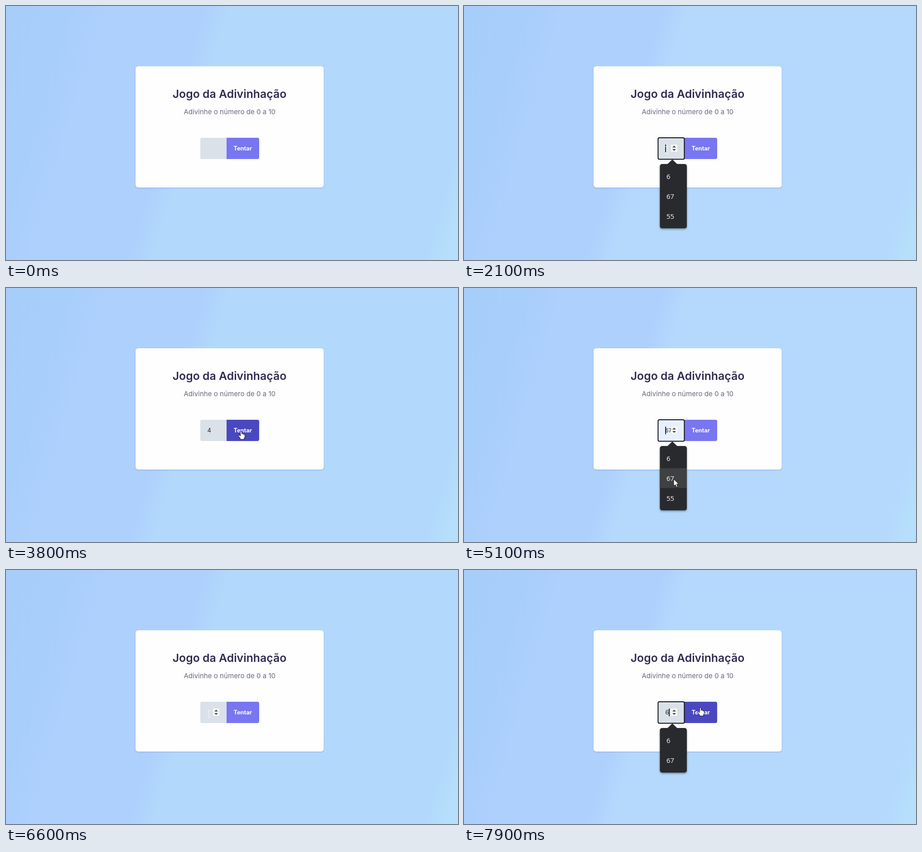
Write an HTML page that moves like this. It is 998 by 561 pixels and loops after 8000 ms.

```html
<!DOCTYPE html>
<html lang="pt">
<head>
<meta charset="utf-8">
<title>Jogo da Adivinhação</title>
<style>
  html, body { margin: 0; width: 100%; height: 100%; overflow: hidden; }
  body {
    --wide: #b2d9fb;
    background: linear-gradient(107deg,
      #a7cefb 0, #a8cefc 125px, #aed0fd 225px, #aed0fd 422px,
      var(--wide) 476px, var(--wide) 1050px, #b5dffa 1090px);
  }
  body.open { --wide: #b5d9fd; }
  svg { display: block; }
  text { font-family: Inter, "Open Sans", sans-serif; }
  .mid { text-anchor: middle; }
  .card { filter: drop-shadow(0 1.5px 1.5px rgba(60, 100, 170, .35)); }
  .menu { filter: drop-shadow(0 2px 2px rgba(0, 0, 0, .4)); }
  .menu text { font: 15px "Open Sans", "Noto Sans", sans-serif; fill: #fff; }
  #value { font-size: 13px; fill: #222; }
  #value.preview { font: 12.5px "Liberation Sans", Arial, sans-serif; }
</style>
</head>
<body>
<svg width="998" height="561" viewBox="0 0 998 561">
  <rect class="card" x="286" y="133" width="415.5" height="268" rx="6" fill="#fefefe"/>
  <text class="mid" x="493.5" y="202.5" font-size="24.8" font-weight="600" fill="#2e2b52">Jogo da Adivinhação</text>
  <text class="mid" x="493.8" y="239" font-size="15.1" fill="#6a677c">Adivinhe o número de 0 a 10</text>

  <path id="button" d="M487 291h68a4 4 0 0 1 4 4v39a4 4 0 0 1-4 4h-68z"/>
  <text class="mid" x="522.7" y="319" font-size="12.8" font-weight="700" fill="#fff">Tentar</text>

  <path id="field" d="M487 291h-54a4 4 0 0 0-4 4v39a4 4 0 0 0 4 4h54z"/>
  <text id="value" x="444.5" y="319"></text>
  <g id="spinner">
    <rect x="457" y="306" width="14" height="16" fill="#f7f8f9"/>
    <path d="M460 312.5l4-4 4 4zM460 316l4 4 4-4z" fill="#444"/>
  </g>
  <rect id="caret" y="306" width="1.6" height="17" fill="#000"/>
  <rect id="ring" x="428.5" y="291" width="58" height="47.5" rx="3" fill="none" stroke="#101010" stroke-width="2"/>

  <g id="menu" class="menu">
    <path d="M448.5 350L460 339l11.5 11z" fill="#292a2d"/>
    <rect id="panel" x="432.5" y="349" width="59.5" rx="5" fill="#292a2d"/>
    <rect id="highlight" x="432.5" width="59.5" height="43.7" fill="#3f4042"/>
    <g id="rows"></g>
  </g>

  <g id="cursor">
    <path id="arrow" d="M0 0V15.5L3.6 12.2 6.1 17.8 8.7 16.7 6.3 11.2H11z" fill="#fff" stroke="#111" stroke-linejoin="round"/>
    <path id="beam" d="M-4 -7.5h3.2l.8 .8 .8-.8H4M0 -7V7M-4 7.5h3.2l.8-.8 .8 .8H4" fill="none" stroke="#f4f7f9" stroke-width="1.2"/>
    <path id="hand" d="M-1.6 1Q0-1 1.6 1V6.5Q3-.2 4.4 7Q6 5.8 6.8 7.8Q8.6 7 8.6 9.4V13L6.8 16V18.3H-1.8V16L-5.8 10.8Q-6.3 8.2-3.8 8.9L-1.6 11z" fill="#fff" stroke="#111" stroke-linejoin="round"/>
  </g>
</svg>
<script>
const LOOP = 8000, STEP = 100, BLINK = 1060;
const ROW = 43.7, TOP = 354.3;
const HISTORY = ['6', '67', '55'];
const $ = id => document.getElementById(id);
const show = (id, on) => { $(id).style.display = on ? '' : 'none'; };

const spots = {
  corner: [60, 14], field: [448, 318], button: [519, 316], buttonTop: [522, 304],
  row: [463, 422], beside: [495, 450], away: [517, 436]
};
const smooth = k => k * k * (3 - 2 * k);
const settle = k => 1 - (1 - k) ** 5;

// The pointer rests at each spot until the next move begins
const moves = [
  { from: 500, to: 1800, spot: 'field', ease: settle },
  { from: 2200, to: 3000, spot: 'beside' },
  { from: 3300, to: 3800, spot: 'button' },
  { from: 4100, to: 4300, spot: 'field' },
  { from: 4500, to: 5100, spot: 'row' },
  { from: 5100, to: 5400, spot: 'away' },
  { from: 5500, to: 6000, spot: 'button' },
  { from: 6300, to: 6600, spot: 'field' },
  { from: 7100, to: 7900, spot: 'buttonTop' }
];

// Each guess: click the field, type a digit, press the button
const guesses = [
  { click: 2100, type: 3200, digit: '4', press: 3800 },
  { click: 4500, type: 5700, digit: '8', press: 6100 },
  { click: 6900, type: 7600, digit: '6', press: LOOP }
];

function pointer(t) {
  if (t < moves[0].from) return null;
  const i = moves.filter(m => m.from <= t).length - 1;
  const { from, to, spot, ease = smooth } = moves[i];
  const a = spots[i ? moves[i - 1].spot : 'corner'], b = spots[spot];
  const k = ease(Math.min(1, (t - from) / (to - from)));
  return a.map((v, n) => Math.round(v + (b[n] - v) * k));
}

function fieldState(t) {
  const g = guesses.filter(g => g.click <= t).pop();
  if (!g) return { value: '', focus: false, items: [] };
  const typed = t >= g.type, focus = t < g.press;
  const value = typed && t < g.press + 200 ? g.digit : '';
  const items = focus ? HISTORY.filter(s => s.startsWith(value)) : [];
  const phase = (t - (typed ? g.type : g.click) + 170) % BLINK;
  return { value, focus, items, blinkOn: phase < BLINK / 2 };
}

const inside = (p, x0, y0, x1, y1) => !!p && p[0] >= x0 && p[0] < x1 && p[1] >= y0 && p[1] < y1;
const onField = p => inside(p, 429, 291, 487, 338);
const onButton = p => inside(p, 487, 291, 559, 338);

function buttonColor(k) {
  const from = [120, 118, 240], to = [74, 72, 192];
  return `rgb(${from.map((c, i) => Math.round(c + (to[i] - c) * k))})`;
}

function drawMenu(items, row) {
  show('menu', items.length);
  $('panel').setAttribute('height', 11 + ROW * items.length);
  show('highlight', row >= 0);
  $('highlight').setAttribute('y', TOP + ROW * Math.max(row, 0));
  $('rows').innerHTML = items.map((s, i) =>
    `<text x="447" y="${382.3 + ROW * i}">${s}</text>`).join('');
}

function drawField({ value, focus, blinkOn }, preview, hovered) {
  $('field').setAttribute('fill', preview ? '#e8f0fe' : '#dae1e8');
  $('value').textContent = preview || value;
  $('value').setAttribute('class', preview ? 'preview' : '');
  show('spinner', focus || hovered);
  show('ring', focus);
  show('caret', focus && (preview || blinkOn));
  $('caret').setAttribute('x', value && !preview ? 452.4 : 444.4);
}

function drawCursor(p) {
  show('cursor', p);
  if (!p) return;
  $('cursor').setAttribute('transform', `translate(${p})`);
  show('beam', onField(p));
  show('hand', onButton(p));
  show('arrow', !onField(p) && !onButton(p));
}

function draw(t) {
  const p = pointer(t), before = pointer(t - STEP);
  const state = fieldState(t), { items } = state;
  const overMenu = inside(p, 432, TOP, 492, TOP + ROW * items.length);
  const row = overMenu ? Math.floor((p[1] - TOP) / ROW) : -1;

  document.body.className = items.length ? 'open' : '';
  $('button').setAttribute('fill', buttonColor(onButton(p) ? 1 : onButton(before) ? .4 : 0));
  drawField(state, items[row], onField(p));
  drawMenu(items, row);
  drawCursor(p);
}

const start = performance.now();
let last = -1;
function tick() {
  const now = Math.max(0, performance.now() - start) % LOOP;
  const t = Math.floor(now / STEP) * STEP;
  if (t !== last) draw(last = t);
  requestAnimationFrame(tick);
}
tick();
</script>
</body>
</html>
```
